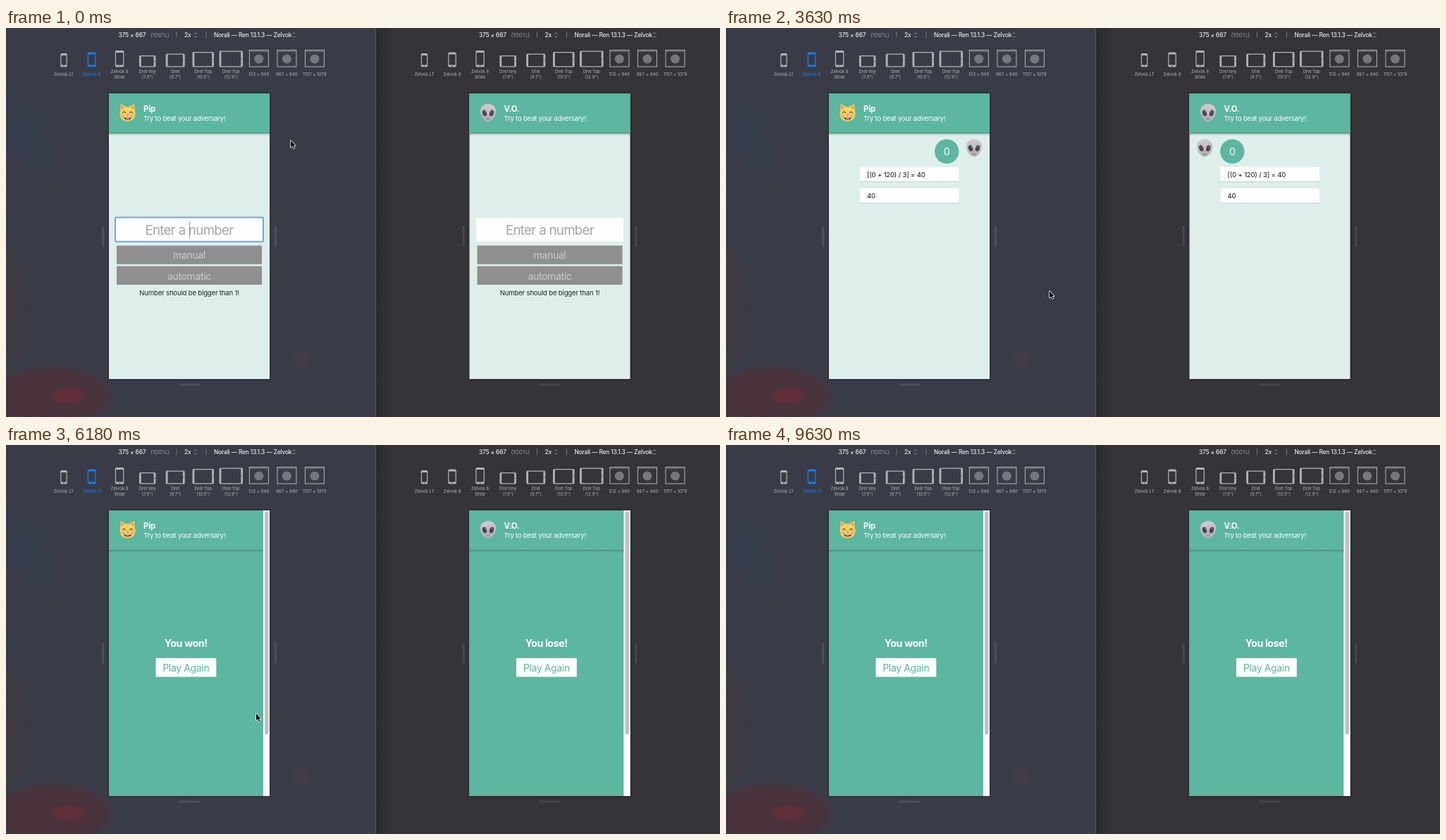
Write an HTML page with a canvas that moves like this. It is 1013 by 553 pixels and loops after 9940 ms.

```html
<!DOCTYPE html>
<html lang="en">
<head>
<meta charset="utf-8">
<style>
html, body { margin: 0; width: 100%; height: 100%; overflow: hidden; background: #353439; }
canvas { display: block; width: 1013px; height: 553px; }
</style>
</head>
<body>
<canvas id="stage"></canvas>
<script>
const W = 1013, H = 553, LOOP = 9940, SHIFT = 511.5;
const TEAL = '#5cb6a0', MINT = '#deefeb', WHITE = '#fefefe';
const canvas = document.getElementById('stage');
const dpr = window.devicePixelRatio || 1;
canvas.width = W * dpr;
canvas.height = H * dpr;
const ctx = canvas.getContext('2d');

// Pointer stops: [time, x, y]; it jumps from one to the next.
const pointerStops = [
  [0, 404, 160], [1370, 402, 165], [1520, 397.5, 174], [1670, 374, 228], [1820, 332, 315],
  [1970, 300, 377], [2100, 288, 370], [2250, 289, 365], [2550, 290, 365],
  [2850, 302, 369], [3000, 350, 384], [3180, 420, 382], [3330, 459, 374],
  [5280, 453, 375], [5430, 430, 379], [5580, 402, 382], [5730, 377, 383], [5880, 363, 383],
  [6030, 359, 382], [6180, 355, 382], [7680, 363, 380], [7830, 367, 370], [7980, 370, 350],
  [8130, 371, 325], [8280, 370, 302], [8430, 369, 287], [8580, 368, 282],
  [8730, 430, 200], [8880, 560, 120], [9030, 700, 150], [9180, 830, 280],
  [9330, 920, 420], [9480, 975, 545], [9630, 1100, 600]
];

const moves = [
  { at: 3630, by: 'alien', add: '0', sum: '[(0 + 120) / 3] = 40', result: '40' },
  { at: 4530, by: 'kitty', add: '-1', sum: '[(-1 + 40) / 3] = 13', result: '13' },
  { at: 5430, by: 'alien', add: '-1', sum: '[(-1 + 13) / 3] = 4', result: '4' }
];

const devices = [
  { label: ['Zelvok LT'], w: 9.5, h: 19.5 },
  { label: ['Zelvok 8'], w: 11.5, h: 21 },
  { label: ['Zelvok 8', 'Wide'], w: 12.5, h: 23.5 },
  { label: ['Drel tiny', '(7.9")'], w: 23.5, h: 16.5 },
  { label: ['Drel', '(9.7")'], w: 27, h: 19 },
  { label: ['Drel Top', '(10.5")'], w: 30.5, h: 21.5 },
  { label: ['Drel Top', '(12.9")'], w: 33.5, h: 23 },
  { label: ['512 × 949'] },
  { label: ['867 × 840'] },
  { label: ['1157 × 1079'] }
];

const players = [
  { x: 0, face: 'kitty', name: 'Pip', verdict: 'You won!' },
  { x: SHIFT, face: 'alien', name: 'V.O.', verdict: 'You lose!' }
];

function rect(x, y, w, h, color) {
  ctx.fillStyle = color;
  ctx.fillRect(x, y, w, h);
}

function round(x, y, w, h, r, color) {
  ctx.fillStyle = color;
  ctx.beginPath();
  ctx.roundRect(x, y, w, h, r);
  ctx.fill();
}

function ellipse(x, y, rx, ry, color, turn = 0) {
  ctx.fillStyle = color;
  ctx.beginPath();
  ctx.ellipse(x, y, rx, ry, turn, 0, 7);
  ctx.fill();
}

function line(points, color, width) {
  ctx.strokeStyle = color;
  ctx.lineWidth = width;
  ctx.beginPath();
  points.forEach(([x, y]) => ctx.lineTo(x, y));
  ctx.stroke();
}

function shape(path, color) {
  ctx.fillStyle = color;
  ctx.fill(new Path2D(path));
}

// Text whose capitals are centred on y.
function text(str, x, y, size, color, { align = 'left', weight = 400, track = -0.02 } = {}) {
  ctx.font = `${weight} ${size}px Inter, "Open Sans", sans-serif`;
  ctx.letterSpacing = `${track * size}px`;
  ctx.textAlign = align;
  ctx.fillStyle = color;
  ctx.fillText(str, x, y + size * 0.36);
}

function glow(x, y, rx, ry, rgb, alpha, core = 0) {
  ctx.save();
  ctx.translate(x, y);
  ctx.scale(rx, ry);
  const g = ctx.createRadialGradient(0, 0, core, 0, 0, 1);
  g.addColorStop(0, `rgba(${rgb},${alpha})`);
  g.addColorStop(1, `rgba(${rgb},0)`);
  ctx.fillStyle = g;
  ctx.fillRect(-1, -1, 2, 2);
  ctx.restore();
}

function backdrop() {
  rect(0, 0, 525, H, '#393c47');
  ctx.save();
  ctx.beginPath();
  ctx.rect(0, 0, 525, H);
  ctx.clip();
  glow(5, 190, 75, 130, '46,61,79', 0.6, 0.3);
  glow(10, 215, 45, 70, '66,58,72', 0.5, 0.4);
  glow(0, 400, 40, 110, '72,54,66', 0.5, 0.2);
  glow(66, 524, 92, 46, '76,49,58', 0.85, 0.75);
  glow(88, 523, 27, 13, '104,45,53', 0.8, 0.6);
  glow(418, 471, 17, 16, '84,60,70', 0.5, 0.2);
  ctx.restore();
  rect(525, 0, W - 525, H, '#353439');
  const shade = ctx.createLinearGradient(525, 0, 548, 0);
  shade.addColorStop(0, '#2a292d');
  shade.addColorStop(1, '#353439');
  rect(525, 0, 23, H, shade);
  rect(524, 0, 1, H, '#55565d');
}

function chevrons(x) {
  for (const s of [-1, 1]) {
    line([[x - 2, 10 + s * 1.5], [x, 10 + s * 3.5], [x + 2, 10 + s * 1.5]], '#b4b5b9', 0.8);
  }
}

function deviceIcon({ w, h }, x, color) {
  if (!w) {
    ctx.strokeStyle = color;
    ctx.lineWidth = 1;
    ctx.strokeRect(x - 13.5, 31.5, 27, 23.5);
    line([[x - 13, 33.2], [x + 13, 33.2]], color, 0.6);
    ellipse(x, 44, 6.5, 6.5, '#77787d');
    return;
  }
  const phone = w < h, bx = phone ? 1.2 : 2.8, by = phone ? 3 : 1.3;
  const top = 55.5 - h, left = x - w / 2;
  ctx.fillStyle = color;
  ctx.beginPath();
  ctx.roundRect(left, top, w, h, 2);
  ctx.rect(left + bx, top + by, w - 2 * bx, h - 2 * by);
  ctx.fill('evenodd');
  if (phone) ellipse(x, 54, 0.8, 0.8, '#3b3d46');
  else ellipse(left + w - 1.4, top + h / 2, 0.7, 0.7, '#3b3d46');
}

function toolbar(active) {
  const pale = '#e9e9eb', gray = '#b3b4b8';
  text('375 × 667', 159.5, 10, 8.4, pale, { weight: 500 });
  text('(100%)', 205, 10, 8.2, '#97989d');
  text('2x', 253, 10, 8.4, pale, { weight: 500 });
  text('Norali — Ren 13.1.3 — Zelvok', 295, 10, 8.4, pale, { weight: 500 });
  rect(241.5, 5, 1, 9, '#73747b');
  rect(283.5, 5, 1, 9, '#73747b');
  chevrons(269);
  chevrons(408.5);
  devices.forEach((device, i) => {
    const x = 82 + i * 39.55, color = i === active ? '#1581f8' : gray;
    deviceIcon(device, x, color);
    const y = device.label.length > 1 ? 62 : 66;
    device.label.forEach((row, k) =>
      text(row, x, y + k * 8, 6.2, color, { align: 'center', track: 0 }));
  });
}

function kitty(x, y) {
  ctx.save();
  ctx.translate(x, y);
  ctx.lineCap = 'round';
  shape('M-10.5-1 L-9.8-11.5 Q-9-13-7.5-11.8 L-2-8 H2 L7.5-11.8 Q9-13 9.8-11.5 L10.5-1Z', '#f3c45b');
  shape('M-8.6-4 L-8.4-10 L-4.5-7Z M8.6-4 L8.4-10 L4.5-7Z', '#d99a55');
  ellipse(0, 1.8, 11.2, 10.4, '#f8d063');
  for (const s of [-1, 1]) {
    line([[s * 7, 0.6], [s * 6, -1.2], [s * 4.5, -1.5], [s * 3, 0.4]], '#6a4a2c', 1.1);
    line([[s * 8, 3.6], [s * 12, 2.6]], '#b58a4c', 0.5);
    line([[s * 8, 5.2], [s * 12, 5.8]], '#b58a4c', 0.5);
  }
  shape('M-6.2 4 Q0 5.6 6.2 4 Q5.6 10.4 0 10.4 Q-5.6 10.4-6.2 4Z', '#6f3c2a');
  shape('M-5.6 4.6 Q0 6 5.6 4.6 L5 6.6 Q0 7.6-5 6.6Z', '#fff4e2');
  ellipse(0, 9, 2.8, 1.2, '#e2786c');
  shape('M-1.8 1.8 H1.8 L0 3.6Z', '#c9736a');
  ctx.restore();
}

function alien(x, y) {
  ctx.save();
  ctx.translate(x, y);
  const head = ctx.createLinearGradient(0, -12, 0, 12);
  head.addColorStop(0, '#cfcbce');
  head.addColorStop(1, '#b3adb3');
  shape('M0-12.5 C7.5-12.5 11.3-7.5 11.2-1.5 C11 6 4.5 12.5 0 12.5 C-4.5 12.5-11 6-11.2-1.5 C-11.3-7.5-7.5-12.5 0-12.5Z', head);
  for (const s of [-1, 1]) {
    ellipse(s * 5, 0.4, 2.9, 4.5, '#4a434b', s * 0.35);
    ellipse(s * 5 + 0.8, -1.4, 0.8, 1.1, '#8c858d');
    ellipse(s * 0.9, 5.2, 0.4, 0.5, '#79727a');
  }
  line([[-2.4, 8], [-1, 8.8], [1, 8.8], [2.4, 8]], '#675f68', 0.9);
  ctx.restore();
}

const faces = { kitty, alien };

function header(player) {
  rect(146, 93, 228, 57, TEAL);
  faces[player.face](172.5, 120.5);
  text(player.name, 195, 114.5, 11.4, '#fff', { weight: 700 });
  text('Try to beat your adversary!', 195, 128.5, 9.5, '#fff');
}

function headerShadow(width) {
  const g = ctx.createLinearGradient(0, 148.5, 0, 153);
  g.addColorStop(0, 'rgba(75,100,95,.55)');
  g.addColorStop(1, 'rgba(75,100,95,0)');
  rect(146, 149, width, 4, g);
}

function button(label, y, on) {
  rect(157, y, 206, 26.5, on ? TEAL : '#8f8f8f');
  text(label, 260, y + 14, 14, on ? '#fff' : '#cbcbcb', { align: 'center', track: -0.025 });
}

function form({ value, focused, caret }) {
  const valid = +value > 1, dy = valid ? 8 : 0;
  if (focused) {
    round(154, 268.3 + dy, 212, 36.4, 2, '#74a5ea');
    rect(156, 270.3 + dy, 208, 32.4, WHITE);
  } else {
    rect(155.7, 270 + dy, 208.8, 33.3, WHITE);
  }
  text(value || 'Enter a number', 260, 287.2 + dy, value ? 19 : 18.6, value ? TEAL : '#a5a5a5',
    { align: 'center', track: -0.035 });
  if (caret) {
    const x = value ? 260 + ctx.measureText(value).width / 2 : 260;
    rect(x, 275 + dy, 1, 24, TEAL);
  }
  button('manual', 309.3 + dy, valid);
  button('automatic', 338.5 + dy, valid);
  if (!valid) text('Number should be bigger than 1!', 260, 377, 9.6, '#222625', { align: 'center' });
}

function card(str, y) {
  rect(190, y + 1, 140.5, 20.8, '#c9d9d5');
  rect(190, y, 140.5, 20.4, WHITE);
  text(str, 200, y + 10.6, 9.6, '#111');
}

function moveRow(move, i, own) {
  const dy = i * 109.5;
  faces[move.by](own ? 167.8 : 352, 170.5 + dy);
  const x = own ? 206.8 : 313.2;
  ellipse(x, 175.5 + dy, 17.2, 17.2, TEAL);
  text(move.add, x, 175.7 + dy, 14.4, '#fff', { align: 'center' });
  card(move.sum, 197.5 + dy);
  card(move.result, 228 + dy);
}

function verdict(player) {
  rect(146, 150, 219, 349, TEAL);
  headerShadow(219);
  text(player.verdict, 255.2, 281.5, 14.3, '#fff', { align: 'center', weight: 700, track: -0.03 });
  rect(212.5, 303, 85.8, 26.6, WHITE);
  text('Play Again', 255.3, 317, 14, TEAL, { align: 'center', track: -0.025 });
  rect(365, 93, 9, 406, WHITE);
  round(367, 94.3, 5.6, 317.2, 2.8, '#c1c1c1');
}

function phone(player, t) {
  const left = player.x === 0, handle = left ? '#4d505b' : '#47464b';
  round(136.2, 281, 3, 30, 1.5, handle);
  round(380.8, 281, 3, 30, 1.5, handle);
  round(245, 505.5, 30, 3, 1.5, handle);
  ctx.save();
  ctx.shadowColor = 'rgba(0,0,0,.5)';
  ctx.shadowBlur = 4 * dpr;
  rect(146, 93, 228, 406, MINT);
  ctx.restore();
  header(player);
  if (t >= 6180) return verdict(player);
  headerShadow(228);
  if (t < 2850) form(left ? inputState(t) : { value: '' });
  moves.forEach((move, i) => {
    if (t >= move.at) moveRow(move, i, (move.by === 'kitty') === left);
  });
}

function inputState(t) {
  const typed = [630, 770, 920].filter(at => t >= at).length;
  return {
    value: '120'.slice(0, typed),
    focused: t < 2400,
    caret: t < 300 || (t >= 630 && t < 1220)
  };
}

function pointer(t) {
  const [, x, y] = pointerStops.findLast(stop => t >= stop[0]);
  const arrow = new Path2D('M0 0 V9.6 L2.2 7.6 L3.7 11 L5.3 10.3 L3.8 7 H6.6Z');
  ctx.save();
  ctx.translate(x, y);
  ctx.lineJoin = 'round';
  ctx.strokeStyle = '#fff';
  ctx.lineWidth = 1.4;
  ctx.stroke(arrow);
  ctx.fillStyle = '#000';
  ctx.fill(arrow);
  ctx.restore();
}

function frame(now) {
  const t = now % LOOP;
  ctx.setTransform(dpr, 0, 0, dpr, 0, 0);
  backdrop();
  for (const player of players) {
    ctx.save();
    ctx.translate(player.x, 0);
    toolbar(player.x === 0 ? 1 : -1);
    phone(player, t);
    ctx.restore();
  }
  pointer(t);
}

const start = performance.now();
function tick() {
  frame(performance.now() - start);
  requestAnimationFrame(tick);
}
tick();
</script>
</body>
</html>
```
